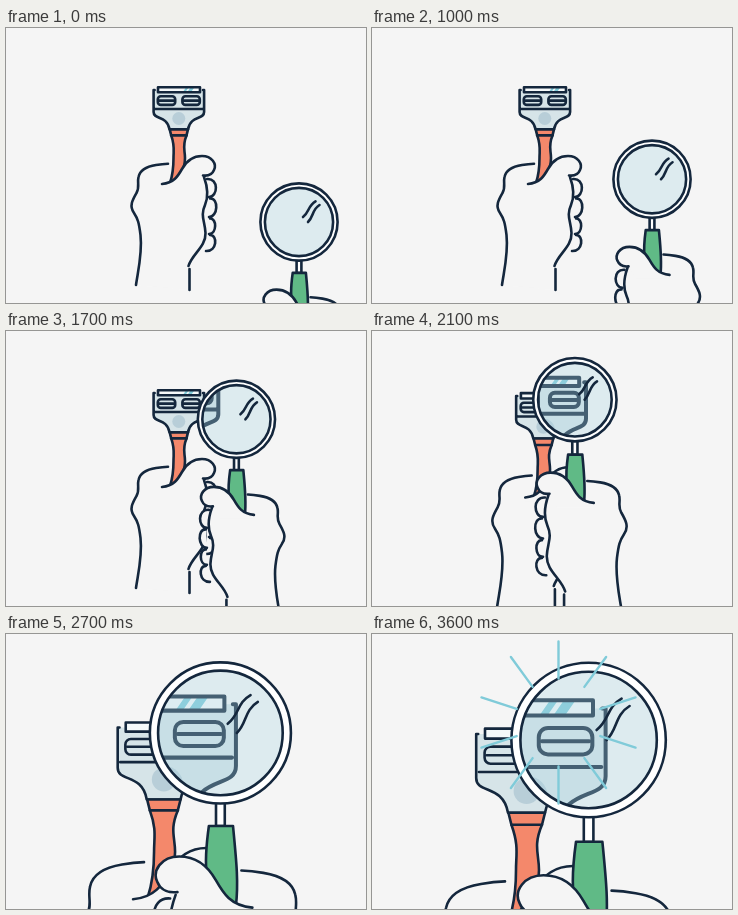
These frames come from a looping animation (360x275 px, 3800 ms). An HTML page with a canvas:

```html
<!DOCTYPE html>
<html>
<head>
<meta charset="utf-8">
<style>
html, body { margin: 0; width: 100%; height: 100%; overflow: hidden; background: #f5f5f5; }
canvas { display: block; }
</style>
</head>
<body>
<canvas width="360" height="275"></canvas>
<script>
const ctx = document.querySelector('canvas').getContext('2d');
const BG = '#f5f5f5', INK = '#14273d', RED = '#f4886b', GREEN = '#60ba86', CYAN = '#80cbd9';
const LOOP = 3800, STEP = 100, LINE = 2.6;
const PIVOT = { x: 191, y: 24 };
const ZOOM_CENTER = { x: 171.8, y: 85.6 }, LENS_ZOOM = 1.54;

// Lens path: step, x, y
const KEYS = [[0, 293, 194], [1, 289, 178], [6, 264, 116], [12, 213.5, 76.5],
  [14, 202, 65.4], [18, 203.8, 65]];

const path = d => new Path2D(d);

const PALM_EDGE = 'M130 257C132 243 136.5 225 134.5 207C133 195 132 191 128 185' +
  'C123 178 126.5 172 130.5 165C134 159 131 155 132.5 149C134 142 141 138.5 150 137C155 136.1 158 135.8 162 135.7';
const PALM_INNER = '198 149C202 160 202 170 199 177C194 188 199 193 199.5 205C200 219 186 226 182.5 238';
const THUMB = 'M156 156C168 155 172 148 176 141C181 132 188 128 196 128' +
  'C206 128 211 136 208 142C206 147 201 148 197 147.5';
const hand = {
  fill: path(PALM_EDGE + 'L' + PALM_INNER + 'L183.5 262Z'),
  lines: path(PALM_EDGE + 'M' + PALM_INNER + 'M183.5 241V262'),
  fingers: path('M201 151C213 150 212 169 203 169M204 170.5C213 170 212 189 203 189' +
    'M204 190.5C211 190 211 206 203 206M204 207C212 207 211 223.5 200 223'),
  thumbFill: path(THUMB + 'L190 160H156Z'),
  thumb: path(THUMB)
};
const redHandle = path('M163.7 101.4H182L180.5 107.4C176 118 179 122 179 130C179 140 174 151 164 155' +
  'C167 146 167.5 138 167.5 130C167.5 122 169 118 165.2 107.4Z');
const redCollar = path('M165.2 107.4H180.5');
const greenHandle = path('M166.6 111.3H179.8C181 120 182 130 181 138L172 153L165 155' +
  'C163.5 142 164.8 130 166.6 111.3Z');
const razorBody = path('M147.6 62V84C147.6 92 161 87 163.5 101.4H182C184.6 87 198.1 92 198.1 84V62Z');
const razorLines = path('M148.6 62H147.6V84C147.6 92 161 87 163.5 101.4H182C184.6 87 198.1 92 198.1 84V62H197' +
  'M149 81H196.7');
const glints = path('M176.5 64.4L180 59.4H182.6L179.1 64.4ZM181 64.4L184.5 59.4H188.3L184.8 64.4Z');
const marks = path('M16.5 -20.7C9 -16.5 10.5 -10 4 -5M20.5 -17C13 -12.5 14.5 -5 9 0');

function paint(shape, fill, stroke = true) {
  if (fill) { ctx.fillStyle = fill; ctx.fill(shape); }
  if (stroke) { ctx.strokeStyle = INK; ctx.stroke(shape); }
}

function circle(x, y, r) {
  const p = new Path2D();
  p.arc(x, y, r, 0, Math.PI * 2);
  return p;
}

function box(x, y, w, h, r = 0) {
  const p = new Path2D();
  p.roundRect(x, y, w, h, r);
  return p;
}

function drawRazor() {
  paint(razorBody, '#d6e4e8', false);
  paint(circle(172.8, 90.5, 6.5), '#b8ced8', false);
  paint(razorLines);
  const bar = box(152, 59.3, 42, 5);
  paint(bar, '#f5f9fa', false);
  paint(glints, CYAN, false);
  paint(bar);
  for (const x of [151.8, 176.4]) {
    paint(box(x, 68.3, 17.4, 8.6, 3), '#d6e4e8');
    paint(path(`M${x + 1} 72.6h15.4`));
  }
}

function drawHand(handle, color) {
  paint(hand.fingers, BG);
  paint(hand.fill, BG, false);
  paint(hand.lines);
  paint(handle, color);
  if (handle === redHandle) paint(redCollar);
  paint(hand.thumbFill, BG, false);
  paint(hand.thumb);
}

function drawMagnifier(lens) {
  paint(box(lens.x - 2.4, lens.y + 38, 4.8, 13), '#fff');
  paint(circle(lens.x, lens.y, 38.6), '#fff');
  const glass = circle(lens.x, lens.y, 34.1);
  ctx.save();
  ctx.clip(glass);
  paint(glass, BG, false);
  ctx.save();
  ctx.translate(ZOOM_CENTER.x, ZOOM_CENTER.y);
  ctx.scale(LENS_ZOOM, LENS_ZOOM);
  ctx.translate(-ZOOM_CENTER.x, -ZOOM_CENTER.y);
  drawRazor();
  ctx.restore();
  paint(glass, 'rgba(170,212,224,.33)', false);
  ctx.restore();
  paint(glass);

  ctx.save();
  ctx.translate(lens.x, lens.y);
  paint(marks);
  ctx.scale(-1, 1);
  ctx.translate(-173.5, -60.4);
  drawHand(greenHandle, GREEN);
  ctx.restore();
}

function drawRays() {
  ctx.strokeStyle = CYAN;
  ctx.lineWidth = 2.4;
  ctx.beginPath();
  for (let i = 0; i < 10; i++) {
    const a = i * Math.PI / 5, dx = Math.sin(a), dy = -Math.cos(a);
    ctx.moveTo(186.5 + 44 * dx, 88.5 + 44 * dy);
    ctx.lineTo(186.5 + 81 * dx, 88.5 + 81 * dy);
  }
  ctx.stroke();
}

// Smooth curve through KEYS
function lensAt(n) {
  const last = KEYS.length - 1;
  n = Math.min(Math.max(n, 0), KEYS[last][0]);
  let i = 0;
  while (i < last - 1 && n > KEYS[i + 1][0]) i++;
  const slope = (k, c) => {
    const a = KEYS[Math.max(k - 1, 0)], b = KEYS[Math.min(k + 1, last)];
    return k === last ? 0 : (b[c] - a[c]) / (b[0] - a[0]);
  };
  const p = KEYS[i], q = KEYS[i + 1], h = q[0] - p[0], u = (n - p[0]) / h;
  const at = c => {
    const e = u * u * (3 - 2 * u);
    return p[c] + (q[c] - p[c]) * e +
      h * u * (1 - u) * ((1 - u) * slope(i, c) - u * slope(i + 1, c));
  };
  return { x: at(1), y: at(2) };
}

function render(t) {
  const n = Math.floor(t / STEP) - 7;
  const u = Math.min(Math.max((n - 12) / 11, 0), 1);
  const zoom = 1 + (1 - Math.cos(Math.PI * u)) / 2;

  ctx.fillStyle = BG;
  ctx.fillRect(0, 0, 360, 275);
  ctx.lineCap = ctx.lineJoin = 'round';
  ctx.save();
  ctx.translate(PIVOT.x, PIVOT.y);
  ctx.scale(zoom, zoom);
  ctx.translate(-PIVOT.x, -PIVOT.y);
  ctx.lineWidth = LINE / zoom;
  drawRazor();
  drawHand(redHandle, RED);
  drawMagnifier(lensAt(n));
  ctx.restore();

  // Rays blink: 200 ms on, 100 ms off
  if (t >= 3000 && (t - 3000) % 300 < 200) drawRays();
}

function tick() {
  render(performance.now() % LOOP);
  requestAnimationFrame(tick);
}
tick();
</script>
</body>
</html>
```
